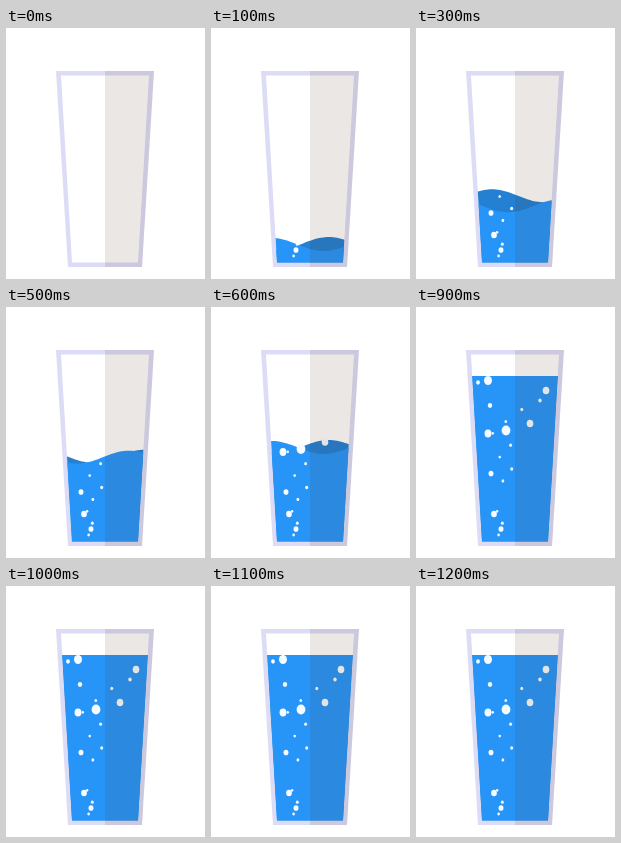
An HTML page that plays this animation: 199 by 251 pixels, repeating every 1.3 s.

```html
<!DOCTYPE html>
<html lang="en">
<head>
<meta charset="utf-8">
<title>Filling glass</title>
<style>
  html, body { margin: 0; width: 100%; height: 100%; overflow: hidden; background: #fff; }
  svg { display: block; width: 199px; height: 251px; }
</style>
</head>
<body>
<svg viewBox="0 0 199 251">
  <defs>
    <clipPath id="inside"><path d="M55 47.6H143L132 234.5H66Z"/></clipPath>
    <clipPath id="outside"><path d="M50 43H148L136 239H62Z"/></clipPath>
  </defs>
  <path d="M50 43H148L136 239H62Z" fill="#dcdcf7"/>
  <path d="M55 47.6H143L132 234.5H66Z" fill="#fff"/>
  <g clip-path="url(#inside)">
    <path id="back" fill="#2480d2"/>
    <path id="front" fill="#2795f8"/>
    <g id="bubbles" fill="#f6fbff"></g>
  </g>
  <path d="M99 43H148V239H99Z" fill="#4a2812" opacity=".11" clip-path="url(#outside)"/>
</svg>
<script>
  const STEP = 100, COUNT = 13, FULL = 9;
  const BOTTOM = 240, BRIM = 69, RISE = 112;
  const WAVELENGTH = 104, PERIOD = 5;
  const $ = id => document.getElementById(id);
  const cosTurn = turns => Math.cos(turns * 2 * Math.PI);

  // Large bubbles: x, y, radius
  const bubbles = [
    [72, 92, 4.2], [62, 94, 2], [130, 102, 3.5], [124, 112, 1.8],
    [74, 117, 2.3], [114, 135, 3.5], [90, 142, 4.6], [72, 145, 3.6],
    [75, 185, 2.6], [78, 207, 3], [85, 222, 2.6]
  ];

  // Small bubbles gather into a narrow stream near the bottom
  for (let i = 0; i < 10; i++) {
    const spread = (i * 0.618 + 0.9) % 1;
    const y = 121 + i * 11.9;
    bubbles.push([82 + (BOTTOM - y) / 3 * (spread - 0.3), y, 1.2 + 0.4 * spread]);
  }

  // Two waves drift in opposite directions while the level eases up
  function waves(step) {
    if (step === 0) return { front: () => BOTTOM, back: () => BOTTOM };
    if (step >= FULL) return { front: () => BRIM, back: () => BRIM };
    const level = BOTTOM - RISE * (1 - (1 - step / FULL) ** 2);
    const turn = (step - 3) / PERIOD;
    const gap = 5 + 5 * cosTurn(turn);
    return {
      front: x => level - 6.5 * cosTurn((x - 40) / WAVELENGTH - 2 * turn),
      back: x => level - gap - 6.5 * cosTurn((x - 76) / WAVELENGTH + turn)
    };
  }

  function drawWave(id, height) {
    let d = `M50 ${BOTTOM}`;
    for (let x = 50; x <= 148; x += 2) d += `L${x} ${height(x).toFixed(2)}`;
    $(id).setAttribute("d", `${d}V${BOTTOM}Z`);
  }

  function draw(step) {
    const { front, back } = waves(step);
    drawWave("front", front);
    drawWave("back", back);

    const lift = step >= FULL ? 18.5 : 0;
    $("bubbles").innerHTML = bubbles
      .map(([x, y, r]) => [x, y < 200 ? y - lift : y, r])
      .filter(([x, y, r]) => y + r + 1 > Math.min(front(x), back(x)))
      .map(([x, y, r]) => `<ellipse cx="${x}" cy="${y}" rx="${r * 0.95}" ry="${r * 1.08}"/>`)
      .join("");
  }

  let last = -1;
  const start = performance.now();
  function tick() {
    const step = Math.floor((performance.now() - start) / STEP) % COUNT;
    if (step !== last) draw(last = step);
    requestAnimationFrame(tick);
  }
  tick();
</script>
</body>
</html>
```
